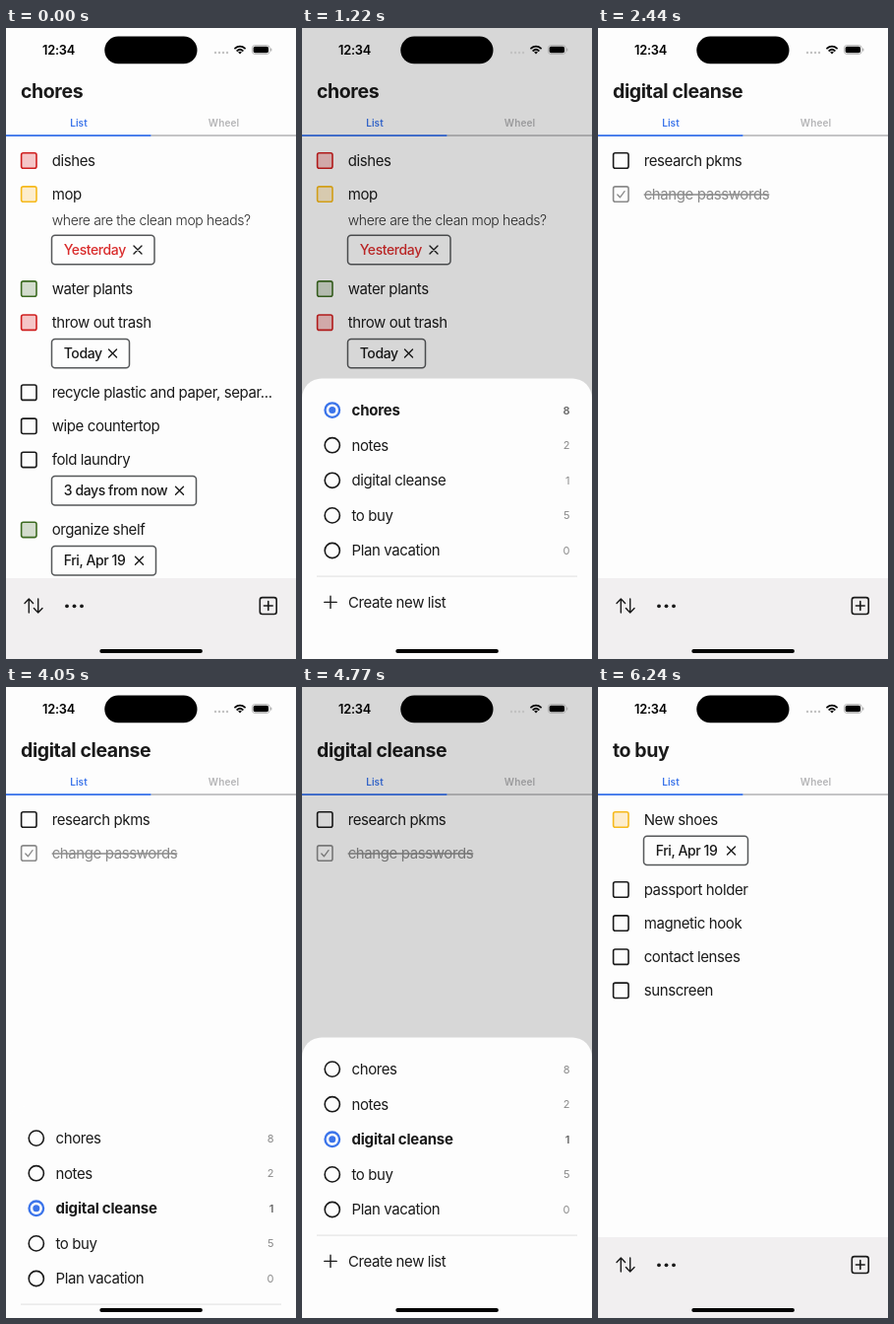
An HTML page for the animation above (8 s loop, 295x640 px).

```html
<!DOCTYPE html>
<html lang="en">
<head>
<meta charset="utf-8">
<title>Chores</title>
<style>
  html, body { margin: 0; width: 100%; height: 100%; overflow: hidden; background: #fdfdfd; }
  svg { display: block; font-family: Inter, Roboto, sans-serif; }
</style>
</head>
<body>
<svg id="stage" width="295" height="640" viewBox="0 0 295 640"></svg>
<script>
const stage = document.getElementById('stage');
const PAPER = '#fdfdfd', INK = '#1a1a1a', BLUE = '#3b74ea', GRAY = '#8a8a8a';
const LOOP = 8000, SHEET_TRAVEL = 284, FIRST_OFFSET = 70;

const BOX_COLORS = {
  red: ['#cf1f1f', '#f5c6c7'],
  yellow: ['#f6b91c', '#fdedcd'],
  green: ['#3d6b22', '#d3dccd'],
  plain: [INK, 'none'],
  done: [GRAY, 'none'],
};

const LISTS = [
  { name: 'chores', count: 8, items: [
    { text: 'dishes', color: 'red' },
    { text: 'mop', color: 'yellow', note: 'where are the clean mop heads?', due: 'Yesterday', chip: 105, late: true },
    { text: 'water plants', color: 'green' },
    { text: 'throw out trash', color: 'red', due: 'Today', chip: 79.5 },
    { text: 'recycle plastic and paper, separ...' },
    { text: 'wipe countertop' },
    { text: 'fold laundry', due: '3 days from now', chip: 147.5 },
    { text: 'organize shelf', color: 'green', due: 'Fri, Apr 19', chip: 106.5 },
  ] },
  { name: 'notes', count: 2 },
  { name: 'digital cleanse', count: 1, items: [
    { text: 'research pkms' },
    { text: 'change passwords', color: 'done' },
  ] },
  { name: 'to buy', count: 5, items: [
    { text: 'New shoes', color: 'yellow', due: 'Fri, Apr 19', chip: 106.5 },
    { text: 'passport holder' },
    { text: 'magnetic hook' },
    { text: 'contact lenses' },
    { text: 'sunscreen' },
  ] },
  { name: 'Plan vacation', count: 0 },
];

// Each visit opens the sheet, then closes it on another list.
const VISITS = [
  { open: 500, close: 1910, step: 106, from: 0, to: 2 },
  { open: 4050, close: 5690, step: 110, from: 2, to: 3 },
];

// Text is placed by the vertical middle of its capitals.
const text = (x, y, str, size, { weight = 400, fill = INK, spacing = -0.4, anchor = 'start', extra = '' } = {}) =>
  `<text x="${x}" y="${y + size * 0.36}" font-size="${size}" font-weight="${weight}" fill="${fill}"
    letter-spacing="${spacing}" text-anchor="${anchor}" ${extra}>${str}</text>`;
const rect = (x, y, w, h, r, fill, stroke = 'none', width = 1.6) =>
  `<rect x="${x}" y="${y}" width="${w}" height="${h}" rx="${r}" fill="${fill}" stroke="${stroke}" stroke-width="${width}"/>`;
const circle = (x, y, r, fill, stroke = 'none', width = 1.6) =>
  `<circle cx="${x}" cy="${y}" r="${r}" fill="${fill}" stroke="${stroke}" stroke-width="${width}"/>`;
const line = (d, stroke = INK, width = 1.5) =>
  `<path d="${d}" fill="none" stroke="${stroke}" stroke-width="${width}" stroke-linecap="round" stroke-linejoin="round"/>`;

function chip(y, { due, chip: width, late }) {
  const x = 46 + width - 17;
  return rect(46.5, y - 14.7, width - 0.5, 29.4, 3.5, PAPER, '#56585a', 1.5) +
    text(58.7, y, due, 14, { weight: 500, fill: late ? '#d92c2c' : INK }) +
    line(`M${x - 4} ${y - 4}l8 8m0 -8l-8 8`, INK, 1.4);
}

function items(list) {
  let y = 134.5, out = '';
  for (const item of list.items) {
    const color = item.color || 'plain', done = color === 'done';
    const [stroke, fill] = BOX_COLORS[color];
    out += rect(15.6, y - 7.7, 15.4, 15.4, 2, fill, stroke);
    if (done) out += line(`M19.8 ${y + 0.4}l2.6 2.8l4.6 -6.2`, GRAY, 1.3);
    out += text(46.7, y, item.text, 15, done ? { fill: GRAY, extra: 'text-decoration="line-through"' } : {});
    if (item.note) {
      out += text(46.7, y + 26, item.note, 14, { weight: 300, fill: '#2a2a2a', spacing: -0.35 });
      y += 25;
    }
    if (item.due) {
      out += chip(y + 31.4, item);
      y += 36.9;
    }
    y += 34.1;
  }
  return out;
}

const header = list =>
  text(15, 64, list.name, 19.5, { weight: 700 }) +
  text(74, 96.5, 'List', 10, { weight: 600, fill: BLUE, spacing: 0.1, anchor: 'middle' }) +
  text(221.5, 96.5, 'Wheel', 10, { weight: 600, fill: '#b4b4b6', spacing: 0.1, anchor: 'middle' }) +
  rect(147.5, 108.3, 147.5, 1.5, 0, '#b4b4b6') +
  rect(0, 108.2, 147.5, 1.8, 0, BLUE);

const toolbar =
  rect(0, 558, 295, 82, 0, '#f1eff0') +
  line('M23.3 593v-14m-4.3 4.4l4.3 -4.4l4.3 4.4M32.7 579v14m-4.3 -4.4l4.3 4.4l4.3 -4.4', INK, 1.4) +
  [62, 69.5, 77].map(x => circle(x, 586.3, 1.9, INK)).join('') +
  rect(258.3, 577.6, 16.9, 16.9, 2.5, 'none', INK) +
  line('M262.4 586h8.8m-4.4 -4.4v8.8', INK, 1.6);

const system =
  text(37, 22, '12:34', 12.8, { weight: 600, fill: '#000', spacing: -0.2 }) +
  rect(100.3, 8.6, 94.2, 27.6, 13.8, '#000') +
  [213, 217, 221, 225].map(x => circle(x, 25, 1.2, '#c2c2c2')).join('') +
  line('M233 20.6a7.3 7.3 0 0 1 10 0M235.2 23a4.2 4.2 0 0 1 5.6 0', '#000', 1.8) +
  '<path d="M238 26.6l-1.9 -2.1a2.9 2.9 0 0 1 3.8 0z"/>' +
  rect(250.4, 17.6, 17.8, 8.8, 2.7, 'none', '#a5a5a5', 0.8) +
  rect(251.6, 18.8, 15.4, 6.4, 1.7, '#000') +
  rect(269.2, 20.5, 1.1, 3, 0.5, '#a5a5a5') +
  rect(95.3, 630, 104.6, 4, 2, '#000');

function sheet(selected, offset) {
  const rows = LISTS.map(({ name, count }, i) => {
    const y = 387.6 + i * 35.6, on = i === selected, weight = on ? 700 : 400;
    return (on
      ? circle(30.8, y, 7.3, 'none', BLUE, 2.3) + circle(30.8, y, 3.5, BLUE)
      : circle(30.8, y, 7.6, 'none', INK)) +
      text(50.5, y, name, 15, { weight, spacing: on ? -0.2 : -0.4 }) +
      text(272.5, y, count, 11, { weight: on ? 600 : 400, fill: on ? '#666' : GRAY, spacing: 0, anchor: 'end' });
  }).join('');
  return `<g transform="translate(0 ${offset})">` +
    rect(0, 355.5, 295, 320, 20, PAPER) + rows +
    rect(15, 555.6, 265, 1, 0, '#dfdfdf') +
    line('M22.8 582.4h12.4m-6.2 -6.2v12.4', INK, 1.4) +
    text(47, 582.4, 'Create new list', 15) + '</g>';
}

// The picture moves in discrete steps of roughly 110 ms.
function stateAt(t) {
  const visit = VISITS.findLast(v => t >= v.open);
  if (!visit) return { list: 0, offset: SHEET_TRAVEL, dim: 0 };
  if (t < visit.close) {
    const step = Math.floor((t - visit.open) / 112.5 - 0.05);
    const offset = t < visit.open + 720 ? FIRST_OFFSET * Math.exp(-1.03 * Math.max(0, step)) : 0;
    return { list: visit.from, offset, dim: 1 - offset / FIRST_OFFSET };
  }
  const step = Math.floor((t - visit.close) / visit.step);
  const offset = step < 5 ? SHEET_TRAVEL * (1 - Math.exp(-0.98 * (step + 0.25))) : SHEET_TRAVEL;
  return { list: visit.to, offset, dim: 1 - offset / SHEET_TRAVEL };
}

let shown = '';
function draw(now) {
  const state = stateAt(now % LOOP), key = JSON.stringify(state);
  if (key !== shown) {
    shown = key;
    const list = LISTS[state.list];
    stage.innerHTML = rect(0, 0, 295, 640, 0, PAPER) + header(list) + items(list) + toolbar +
      `<rect width="295" height="640" opacity="${0.15 * state.dim}"/>` +
      (state.offset < SHEET_TRAVEL ? sheet(state.list, state.offset) : '') + system;
  }
  requestAnimationFrame(draw);
}
draw(performance.now());
</script>
</body>
</html>
```
